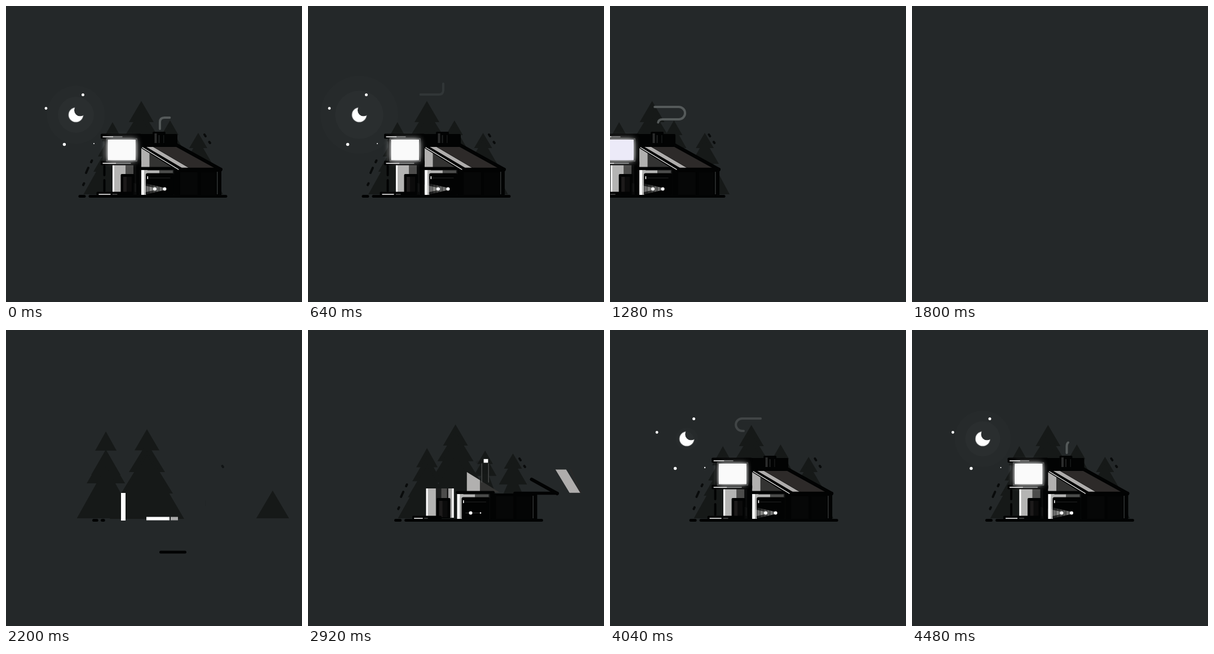
Write an HTML page with a canvas that moves like this. It is 525 by 525 pixels and loops after 4520 ms.

```html
<!DOCTYPE html>
<html lang="en">
<head>
<meta charset="utf-8">
<title>Night house</title>
<style>
html, body { margin: 0; width: 100%; height: 100%; overflow: hidden; background: #242829; }
canvas { display: block; width: 525px; height: 525px; }
</style>
</head>
<body>
<canvas id="stage" width="525" height="525"></canvas>
<script>
const LOOP = 4520, BG = '#242829', TREE = '#161918', INK = '#020303';
const g = document.getElementById('stage').getContext('2d');

const prog = (t, a, b) => Math.min(1, Math.max(0, (t - a) / (b - a)));
const inOut = p => p < .5 ? 4 * p ** 3 : 1 - 4 * (1 - p) ** 3;
const out = p => 1 - (1 - p) ** 3;
const ease = (t, a, b) => inOut(prog(t, a, b));
const pop = (t, a, d = 240) => {
  const p = prog(t, a, a + d) - 1;
  return 1 + 3.2 * p ** 3 + 2.2 * p * p;
};

// Smooth curve through [time, value] points without overshoot
function keys(t, pts) {
  const n = pts.length - 1;
  if (t <= pts[0][0]) return pts[0][1];
  if (t >= pts[n][0]) return pts[n][1];
  let i = 0;
  while (t > pts[i + 1][0]) i++;
  const slope = k => (pts[k + 1][1] - pts[k][1]) / (pts[k + 1][0] - pts[k][0]);
  const tangent = k => {
    if (k === 0 || k === n) return 0;
    const a = slope(k - 1), b = slope(k);
    return a * b > 0 ? 2 * a * b / (a + b) : 0;
  };
  const end = i + 1 === n ? slope(i) : tangent(i + 1);
  const h = pts[i + 1][0] - pts[i][0], p = (t - pts[i][0]) / h, q = 1 - p;
  return q * q * (1 + 2 * p) * pts[i][1] + p * p * (3 - 2 * p) * pts[i + 1][1]
    + h * p * q * (q * tangent(i) - p * end);
}

function box(c, x, y, w, h, r = 0) {
  g.fillStyle = c;
  g.beginPath();
  g.roundRect(x, y, w, h, r);
  g.fill();
}
function disc(c, x, y, r) {
  if (r <= 0) return;
  g.fillStyle = c;
  g.beginPath();
  g.arc(x, y, r, 0, 7);
  g.fill();
}
function trace(p) {
  g.beginPath();
  for (let i = 0; i < p.length; i += 2) g.lineTo(p[i], p[i + 1]);
}
function poly(c, ...p) {
  g.fillStyle = c;
  trace(p);
  g.fill();
}
function line(c, w, ...p) {
  g.strokeStyle = c;
  g.lineWidth = w;
  g.lineCap = g.lineJoin = 'round';
  trace(p);
  g.stroke();
}
// Draws with a shift, and a scale about (ox, oy)
function part(dx, dy, sx, sy, ox, oy, draw) {
  if (sx <= 0 || sy <= 0) return;
  g.save();
  g.translate(dx + ox, dy + oy);
  g.scale(sx, sy);
  g.translate(-ox, -oy);
  draw();
  g.restore();
}
function fade(a, draw) {
  if (a <= 0) return;
  g.save();
  g.globalAlpha *= a;
  draw();
  g.restore();
}

const drift = t => keys(t, [[2920, 24.5], [3440, 21.3], [3560, 20], [4000, 13], [4480, 1.5],
  [4520, 0], [5080, -28], [5160, -33], [5640, -94], [5800, -187], [5960, -470]]);

function sky(t) {
  const r = keys(t, [[3900, 0], [4200, 46], [4480, 50], [4520, 51.5], [5160, 69], [5800, 65]]);
  disc('#262a2b', 124, 193, r);
  disc('#2a2e2f', 124, 193, r * .62);
  const stars = [[136.5, 157.5, 2.5, 3360], [71, 181.5, 2.4, 3440], [103.5, 245.5, 2.7, 3640], [156, 244, 1, 3760]];
  for (const [x, y, size, at] of stars) disc('#fff', x, y, size * (pop(t, at, 200) + .35 * Math.sin(Math.PI * prog(t, at + 80, at + 320))));
  part(0, 0, pop(t, 3700), pop(t, 3700), 124, 193, () => {
    g.save();
    g.beginPath();
    g.rect(90, 160, 70, 70);
    g.arc(131.5, 185, 10.5, 0, 7);
    g.clip('evenodd');
    disc('#777a7b', 124, 193, 13.6);
    disc('#fff', 124, 193, 12.6);
    g.restore();
  });
}

const tier = (x, top, bottom, half) => poly(TREE, x, top, x + half, bottom, x - half, bottom);

// Trees stand further back, so they drift a little less than the house
function trees(t) {
  const behind = depth => -depth * drift(t);
  const s = keys(t, [[2200, 1], [2600, 0], [2920, -.13], [3250, 0]]);
  const left = 189 + behind(.08) + keys(t, [[1800, -290], [2200, -34.5], [2920, -.5], [3200, 0]]);
  const tall = 240 + behind(.12) + keys(t, [[1840, -340], [2200, -11.6], [2920, 0]]);
  const right = 341 + behind(.08) + keys(t, [[1960, 122], [2200, 109.5], [2700, 10], [2920, 0]]);

  const small = keys(t, [[2400, 0], [2920, .916], [3200, 1]]);
  part(behind(.055), 0, small, small, 291, 334, () => {
    tier(291, 203, 229, 15);
    tier(291, 213, 252, 22);
    tier(291, 232, 334, 38);
  });

  if (t > 1840) {
    tier(tall, 168.5 + 7.5 * s, 206 + 7.5 * s, 22);
    tier(tall, 183 + 17 * s, 235 + 17 * s, 32);
    tier(tall, 198 + 17 * s, 273 + 17 * s, 46);
    tier(tall, 222, 335, 66);
  }
  if (t > 1800) {
    tier(left, 206 - 26 * s, 240 - 26 * s, 19);
    tier(left, 222 - 10 * s, 267 - 10 * s, 26);
    tier(left, 236 - 22 * s, 294 - 22 * s, 34);
    tier(left, 242, 334, 51.5);
  }
  const wide = keys(t, [[1960, 0], [2200, .66], [2920, .82], [3200, 1]]);
  const high = keys(t, [[1960, 0], [2200, .6], [2800, 1]]);
  part(0, 0, wide, high, right, 334, () => tier(right, 252, 334, 44));
  const up = ease(t, 2300, 2650);
  part(0, -6 * (1 - ease(t, 2920, 3150)), up, up, right, 300, () => {
    tier(right, 225, 252, 16);
    tier(right, 237, 280, 25);
  });

  part(behind(.06), 0, 1, 1, 0, 0, () => {
    const dash = (at, ...p) => fade(prog(t, at, at + 60), () => line('#090b0b', 4, ...p));
    dash(2160, 360.5, 241, 362, 243);
    dash(2320, 352, 228, 354, 231);
    dash(2400, 152.5, 274, 151, 277);
    dash(2460, 146, 287, 142, 296);
    dash(2520, 138.5, 314.5, 137, 317.5);
  });
}

function smoke(t) {
  if (t < 3400) return;
  const age = (t - 3400) % 1030;
  const head = age * .375, tail = Math.max(0, (age - 320) * .53);
  if (head <= tail || age > 790) return;
  const sink = prog(age, 160, 340), y = 198 + 3 * sink, bend = 315 - 5 * sink;
  fade(age < 450 ? 1 : keys(age, [[450, 1], [730, .28], [790, 0]]), () => {
    g.strokeStyle = '#555a5a';
    g.lineWidth = 4;
    g.lineCap = 'round';
    g.setLineDash([head - tail, 999]);
    g.lineDashOffset = -tail;
    g.beginPath();
    g.moveTo(273, 218);
    g.lineTo(273, y + 8);
    g.quadraticCurveTo(273, y, 281, y);
    g.lineTo(bend, y);
    g.arc(bend, (y + 179) / 2, (y - 179) / 2, Math.PI / 2, -Math.PI / 2, true);
    g.lineTo(222, 179);
    g.arc(222, 168, 11, Math.PI / 2, Math.PI * 1.5);
    g.lineTo(265, 157);
    g.quadraticCurveTo(273, 157, 273, 149);
    g.lineTo(273, 110);
    g.stroke();
  });
}

function ground(t) {
  if (t < 2140) return;
  const p = ease(t, 2160, 2620);
  line(INK, 5, 131, 337.5, 131 + 8 * out(prog(t, 2140, 2320)), 337.5);
  line(INK, 5, 146 + 3 * p, 337.5, 148 + 242 * p, 337.5);
}

function lowerWall(t) {
  const p = ease(t, 2380, 2760), settle = ease(t, 2860, 3200), shift = -4 * (1 - settle);
  const pale = 17 + 6 * settle;
  part(shift, 0, 1, p, 212, 333, () => {
    box('#4c4c4b', 189, 281, 38, 52);
    box('#1d1e1e', 189 + pale, 281, 10 * (1 - settle), 52);
    box('#b4b4b3', 189, 281, pale, 52);
    box('#fff', 189, 281, 3, 52);
    box('#0b0c0c', 226, 281, 12, 52);
  });
  part(0, 0, (1 - settle) * p, p, 234, 333, () => {
    box('#a5a5a4', 224, 281, 10, 52);
    box('#fff', 231, 281, 3, 52);
  });
  part(0, 0, 1, ease(t, 2520, 2860), 216, 332, () => {
    box(INK, 203.5, 298, 24.5, 36, 2);
    box('#1c1a1a', 208, 303, 11, 29);
    box('#0b0b0b', 214, 303, 9, 29);
  });
  part(0, 0, keys(t, [[2560, 0], [2920, .74], [3200, 1]]), 1, 161, 334, () => {
    box(INK, 160.5, 329.5, 70, 7, 2);
    line('#fff', 1.5, 165, 334, 185, 334);
    line('#777', 1, 189, 334, 197, 334);
  });
  part(0, 0, 1, ease(t, 3020, 3300), 174, 282, () => {
    line(INK, 4, 174.5, 284, 174.5, 300);
    line(INK, 4, 174.5, 309, 174.5, 328);
  });
}

function garage(t) {
  const side = ease(t, 2180, 2700);
  part(0, 0, side, .24 + .76 * side, 329, 305, () => {
    box(INK, 298, 290, 84, 46);
    box('#060707', 309, 295, 31, 40);
    box('#040505', 345, 295, 27, 40);
    box('#303333', 374, 294, 1.6, 40);
  });
  const move = ease(t, 2240, 2720);
  part(0, 0, ease(t, 2380, 2740), 1, 240, 313, () => {
    box('#151616', 240, 291, 58, 45);
    box('#aeaead', 245, 291, 6, 44);
  });
  // lintel rises from the ground line
  part(-20.5 * (1 - move), 40 * (1 - move), ease(t, 2000, 2180), 1, 245, 294, () => {
    box(move > .5 ? '#b4b4b3' : '#fff', 245, 291.5, 41 - 14 * move, 6);
    box(move > .5 ? '#4b4c4b' : '#aaa', 288 - 16 * move, 291.5, 13 + 11 * move, 6);
  });
  part(-60.5 * (1 - move), 0, 1, ease(t, 1940, 2140), 240, 335,
    () => box('#fff', 240, 289 + 2 * move, 8 - 3 * move, 49 - 5 * move));
  part(0, 0, 1, ease(t, 2500, 2840), 272, 335, () => {
    box(INK, 248, 296.5, 50, 39.5, 3);
    line('#222424', 1.2, 254, 305, 291, 305);
    box('#fff', 250.5, 302, 1.6, 5);
  });
  lamps(t);
}

function lamps(t) {
  const grow = ease(t, 2960, 3360);
  for (const x of [264, 281.5]) {
    for (let i = 0; i < 13; i++) {
      const d = i * 2.9, half = 2.2 + i * .68;
      const a = .66 * (1 - i / 14) ** 1.3 * (i % 2 ? .72 : 1) * prog(grow * 13, i, i + 1);
      fade(x - d < 240 ? a * .6 : a, () => box('#dededc', x - d - 2.9, 324.5 - half, 2.9, half * 2));
    }
  }
  const on = pop(t, 2700), second = keys(t, [[2800, 0], [2920, .4], [3120, 1]]);
  fade(.45 * prog(t, 2780, 2900) * (1 - grow), () => line('#666', 1, 255, 324.5, 281, 324.5));
  disc('#fff', 264, 324.5, 3 * on);
  disc('#fff', 281.5, 324.5, 3 * second);
}

function gable(t) {
  const q = 1 - ease(t, 2740, 3220), p = ease(t, 2480, 2760), pale = 14.5 + 11 * q;
  part(22 * q, 0, p, p, 240, 287, () => {
    poly('#333332', 240, 252, 298, 288, 240, 288);
    poly('#b1b0af', 240, 252, 240 + pale, 252 + pale * .62, 240 + pale, 288, 240, 288);
  });
  const rise = ease(t, 2180, 2660);
  part(0, 106 * (1 - rise), ease(t, 1980, 2160), 1, 271, 288,
    () => line(INK, 5, 250 - 10 * rise, 288, 293 + 11 * rise, 288));
}

// Slanted band that straightens out while it slides in
function band(t, at, c, x, w, far) {
  if (t < at) return;
  const p = ease(t, at, at + 620), q = 1 - p;
  const left = x + far * q, wide = (w + (20 - w) * q) * prog(t, at, at + 150);
  const skew = 63 - 44 * q, low = 287 + 2 * q, high = 250 - 3 * q;
  poly(c, left, high, left + wide, high, left + wide + skew, low, left + skew, low);
}

function roof(t) {
  const cover = ease(t, 3080, 3400);
  fade(cover, () => poly(INK, 240, 245, 304, 244, 383, 288, 383, 293, 306, 293, 240, 252));
  band(t, 2910, '#2d2a29', 262, 47, 178);

  // the pale band darkens as it lands, then the light returns along the edge
  fade(1 - prog(t, 3200, 3400), () => band(t, 2720, '#afadac', 249, 12, 191.5));
  const light = 12 * ease(t, 3540, 3900);
  if (light > 0) poly('#afadac', 249, 250, 249 + light, 250, 312 + light, 287, 312, 287);
  fade(prog(t, 3320, 3480) * (1 - prog(t, 3580, 3760)), () => line('#8a8988', 1.2, 310, 249, 373, 285));

  const k = 39 * (1 - ease(t, 2800, 3280)), d = ease(t, 2630, 3180);
  if (t > 2600) {
    line(INK, 6, 381 + k - 78 * d, 290 - 43 * d, 381 + k, 290);
    line(INK, 5.5, 381 + k - 75 * prog(t, 2600, 2860), 289.5, 381 + k, 289.5);
  }
  part(0, 0, 1, ease(t, 2660, 2900), 378, 335, () => line(INK, 4.5, 379, 292, 379, 335));

  const front = ease(t, 3000, 3380);
  if (front > 0) {
    line(INK, 6, 306, 290, 306 - 66 * front, 290 - 42 * front);
    line('#efefee', 1.4, 306, 290, 306 - 64 * front, 290 - 39 * front);
  }
}

function chimney(t) {
  const flat = ease(t, 2960, 3380);
  part(150 * (1 - flat), 0, prog(t, 2960, 3100), 1, 304, 236, () => box(INK, 232, 227, 72, 19, 2));

  const p = ease(t, 2820, 3240), q = 1 - p;
  if (t < 2820) return;
  part(14 * q, 9 * q, 1, 1, 272, 234, () => {
    fade(p, () => {
      box(INK, 262, 224, 20, 22);
      box(INK, 260, 223, 23, 5, 2);
      box('#202222', 270.5, 229, 2, 14);
      box('#181a1a', 279, 229, 1.5, 14);
    });
    fade(prog(t, 2820, 2900) * q, () => {
      box('#767878', 270, 228, .8, 34);
      box('#767878', 282, 228, .8, 34);
    });
  });
  fade(prog(t, 2840, 2920) * (1 - .84 * prog(t, 3560, 3860)),
    () => box('#fff', 263.5 + 25 * q, 226 + 3 * q, 4 + 4 * q, 17 - 11 * q));
}

function upperFloor(t) {
  const p = ease(t, 2960, 3400);
  part(0, 0, 1, ease(t, 2920, 3260), 236, 336, () => box(INK, 231, 228, 8.5, 108));
  part(0, 0, p, 1, 240, 255, () => {
    box(INK, 175, 229, 63, 50);
    box(INK, 168, 226.5, 72, 9, 2);
    box(INK, 168, 274.5, 72, 8, 2);
    line('#fff', 1.3, 172, 232, 190, 232);
    line('#7d7f7f', 1.3, 191, 232, 206, 232);
    line('#fff', 1.3, 172, 279, 195, 279);
    line('#8b8d8d', 1.3, 196, 279, 221, 279);
  });
  const tint = prog(t, 5400, 5780), glow = prog(t, 3640, 4100);
  part(0, 0, ease(t, 3080, 3540), 1, 230, 255, () => {
    g.save();
    g.shadowColor = `rgba(255,255,255,${glow})`;
    g.shadowBlur = 11 * glow;
    const c = `rgb(${250 - 14 * tint},${250 - 16 * tint},${250 - 2 * tint})`;
    box(c, 180.5, 237, 49.5, 36.5);
    g.restore();
    fade(glow * .5, () => {
      g.strokeStyle = '#8d8f8f';
      g.lineWidth = 2;
      g.strokeRect(178.5, 235.5, 53.5, 39.5);
    });
  });
}

function paint(time) {
  const t = time < 1480 ? time + LOOP : time;
  g.fillStyle = BG;
  g.fillRect(0, 0, 525, 525);
  g.save();
  g.translate(drift(t), 0);
  for (const layer of [sky, trees, smoke, lowerWall, gable, garage, roof, chimney, upperFloor, ground]) layer(t);
  g.restore();
}

const begin = performance.now();
function tick() {
  paint((performance.now() - begin) % LOOP);
  requestAnimationFrame(tick);
}
tick();
</script>
</body>
</html>
```
